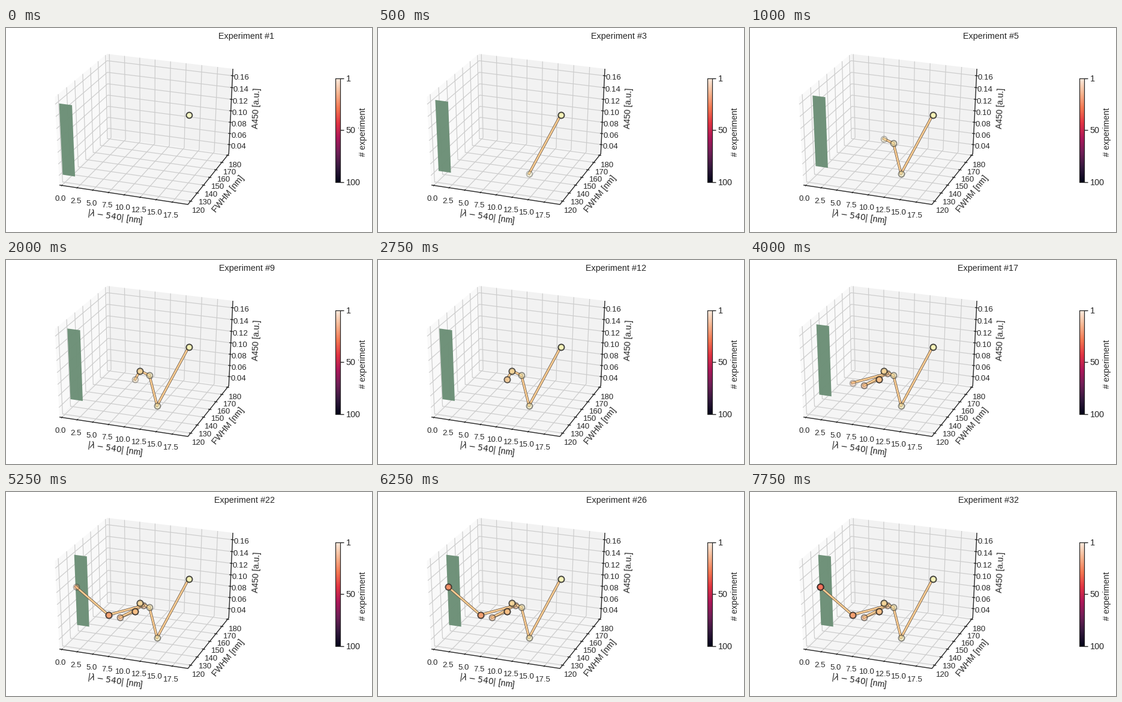
A matplotlib script that plays this animation: 610x340 px, repeating every 8 s.

```python
import numpy as np
import matplotlib.pyplot as plt
from matplotlib.animation import FuncAnimation
from matplotlib.colors import LinearSegmentedColormap

W, H, DPI = 610, 340, 80
PT = 72 / DPI  # points per pixel
INK = "0.15"
BIG, LABEL, SMALL = 14.4 * PT, 14.0 * PT, 13.2 * PT
plt.rcParams["font.family"] = "Liberation Sans"
plt.rcParams["mathtext.fontset"] = "dejavusans"

# Pane limits of the three axes
LO = np.array([-0.4, 116.0, 0.0232])
HI = np.array([19.9, 182.0, 0.1716])
XT = np.arange(0, 17.6, 2.5)
YT = np.arange(120, 181, 10)
ZT = np.arange(0.04, 0.161, 0.02)

AZ, EL, DIST = np.radians(-70), np.radians(30), 10
RIGHT = np.array([-np.sin(AZ), np.cos(AZ), 0])
UP = np.array([-np.sin(EL) * np.cos(AZ), -np.sin(EL) * np.sin(AZ), np.cos(EL)])
NEAR = np.array([np.cos(EL) * np.cos(AZ), np.cos(EL) * np.sin(AZ), np.sin(EL)])

# Visited optima: screen x, screen y, FWHM, drawing order
SPOTS = [
    (304.6, 144.7, 117.6, 4),
    (251.8, 242.7, 122.5, 4),
    (239, 192.2, 126.0, 4),
    (223.1, 184.7, 128.9, 4),
    (215.2, 198.8, 127.4, 4),
    (190.2, 209, 128.1, 4),
    (228.6, 189.2, 134.0, 2.5),
    (170.5, 204.8, 133.5, 4),
    (116.6, 157.9, 135.8, 4),
]
HOLD = [2, 1, 1, 4, 6, 1, 1, 5, 11]  # experiments spent at each spot
PATH = np.repeat(np.arange(len(SPOTS)), HOLD)

ROCKET_R = LinearSegmentedColormap.from_list("rocket_r", [
    "#faebdd", "#f6b48f", "#f37651", "#e13342",
    "#ad1759", "#701f57", "#35193e", "#03051a"])
SPOT_CMAP = plt.get_cmap("magma_r")


def project(x, y, z):
    """Data coordinates to screen pixels."""
    p = (np.array([x, y, z], float) - LO) / (HI - LO) - 0.5
    depth = DIST - p @ NEAR
    return 233.7 + 2256 * (p @ RIGHT) / depth, 164.8 - 1664 * (p @ UP) / depth


fig = plt.figure(figsize=(W / DPI, H / DPI), dpi=DPI, facecolor="white")
ax = fig.add_axes([0, 0, 1, 1])


def face(corners, **style):
    return ax.fill(*zip(*(project(*c) for c in corners)), lw=0, **style)[0]


def stroke(points, color, width, z):
    ax.plot(*zip(*points), color=color, lw=width * PT, zorder=z,
            solid_capstyle="butt")


def path3(points, color, width, z):
    stroke([project(*p) for p in points], color, width, z)


def number(x, y, s, size=SMALL, ha="center"):
    ax.text(x, y + 0.36 * size / PT, s, fontsize=size, color=INK, ha=ha,
            va="baseline")


def name(x, y, s, angle):
    ax.text(x, y, s, fontsize=LABEL, color=INK, ha="center", va="center",
            rotation=angle)


def draw_box():
    (x0, y0, z0), (x1, y1, z1) = LO, HI
    face([(x0, y0, z0), (x0, y1, z0), (x0, y1, z1), (x0, y0, z1)],
         color="0.975", zorder=0)
    face([(x0, y1, z0), (x1, y1, z0), (x1, y1, z1), (x0, y1, z1)],
         color="0.95", zorder=0)
    face([(x0, y0, z0), (x1, y0, z0), (x1, y1, z0), (x0, y1, z0)],
         color="0.9625", zorder=0)

    tx, ty = 0.0125 * (x1 - x0), 0.0125 * (y1 - y0)
    for x in XT:
        path3([(x, y0, z0), (x, y1, z0), (x, y1, z1)], "0.8", 1.2, 1)
        path3([(x, y0 - ty, z0), (x, y0 + ty, z0)], INK, 1.3, 2)
        px, py = project(x, y0, z0)
        number(px - 2, py + 20.6, f"{x:.1f}")
    for y in YT:
        path3([(x1, y, z0), (x0, y, z0), (x0, y, z1)], "0.8", 1.2, 1)
        path3([(x1 - tx, y, z0), (x1 + tx, y, z0)], INK, 1.3, 2)
        px, py = project(x1, y, z0)
        number(px + 13.1, py + 14.7, f"{y}")
    for z in ZT:
        path3([(x0, y0, z), (x0, y1, z), (x1, y1, z)], "0.8", 1.2, 1)
        path3([(x1 - tx, y1, z), (x1 + tx, y1, z)], INK, 1.3, 2)
        px, py = project(x1, y1, z)
        number(px + 15, py + 2.1, f"{z:.2f}")
    path3([(x0, y0, z0), (x1, y0, z0), (x1, y1, z0), (x1, y1, z1)],
          INK, 1.4, 2)

    name(182, 315, r"$|\lambda-540|$ [nm]", -8.5)
    name(370.3, 277, "FWHM [nm]", 50.5)
    name(417.6, 134, "A450 [a.u.]", 87.4)


def draw_colorbar():
    left, right, top, bottom = 549, 557.4, 84.3, 257.3
    ax.imshow(np.linspace(0, 1, 256)[:, None], cmap=ROCKET_R, aspect="auto",
              extent=(left, right, bottom, top), zorder=1)
    stroke([(left, top), (right, top), (right, bottom), (left, bottom),
            (left, top)], INK, 1.2, 2)
    for value in (1, 50, 100):
        y = top + (bottom - top) * (value - 1) / 99
        stroke([(right, y), (right + 5.5, y)], INK, 1.4, 2)
        number(566.5, y, str(value), BIG, "left")
    name(594.5, 173, "# experiment", 90)


draw_box()
draw_colorbar()
ax.set_xlim(0, W)
ax.set_ylim(H, 0)
ax.axis("off")

title = ax.text(447.6, 18, "", fontsize=BIG, color=INK, ha="right",
                va="baseline")
moving = []


def segment(a, b):
    for color, width in (("#5a4a3c", 4.2), ("#fbcd92", 2.8)):
        moving.extend(ax.plot([a[0], b[0]], [a[1], b[1]], color=color,
                              lw=width * PT, zorder=3))


def marker(spot, color, alpha=0.3):
    moving.extend(ax.plot(spot[0], spot[1], "o", ms=9.8 * PT, mfc=color,
                          mec="0.13", mew=1.9 * PT, alpha=alpha,
                          zorder=spot[3]))


def update(i):
    while moving:
        moving.pop().remove()
    title.set_text(f"Experiment #{i + 1}")

    y = SPOTS[PATH[i]][2]
    moving.append(face([(0, y, 0.04), (2, y, 0.04), (2, y, 0.16), (0, y, 0.16)],
                       color=(0.425, 0.56, 0.462), alpha=0.97, zorder=2.2))

    # Translucent markers pile up: one per experiment, one more on leaving
    marker(SPOTS[0], SPOT_CMAP(0.0), 0.85)
    for k in range(1, i + 1):
        a, b = SPOTS[PATH[k - 1]], SPOTS[PATH[k]]
        color = SPOT_CMAP(k / 99)
        if a != b:
            segment(a, b)
            marker(a, color)
        marker(b, color)
    return moving


anim = FuncAnimation(fig, update, frames=len(PATH), interval=250,
                     init_func=lambda: [], repeat=True, repeat_delay=0,
                     blit=False)
plt.show()
```
